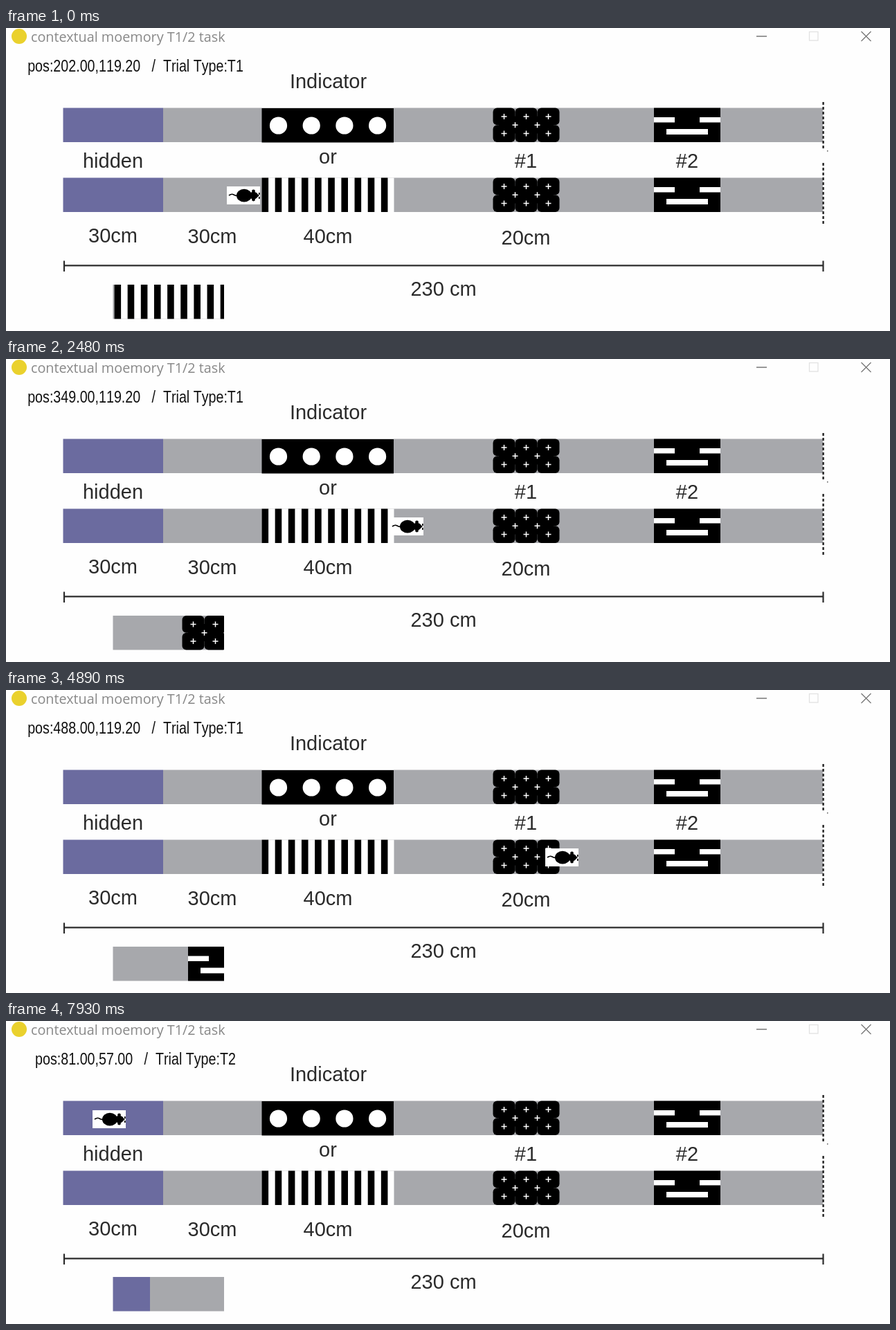
An HTML page that plays this animation: 1277 px wide and 438 px high, repeating every 8000 ms.

```html
<!DOCTYPE html>
<html lang="en">
<head>
<meta charset="utf-8">
<title>Context memory task</title>
<style>
  html, body { margin: 0; width: 100%; height: 100%; overflow: hidden; background: #fefefe; }
  svg { display: block; }
  text { font-family: "Liberation Sans", Arial, sans-serif; font-size: 29px; fill: #2b2b2b; text-anchor: middle; }
  #title { font-family: "Open Sans", "Noto Sans", sans-serif; font-size: 19.8px; fill: #888; text-anchor: start; }
  #status { font-size: 24px; fill: #111; font-kerning: none; }
</style>
</head>
<body>
<svg width="1277" height="438" viewBox="0 0 1277 438">
  <defs>
    <clipPath id="window"><rect x="154.5" y="362" width="160.5" height="68"/></clipPath>
    <g id="lane">
      <rect x="82.5" width="144.5" height="49.5" fill="#6b6b9f"/>
      <rect x="227" width="953" height="49.5" fill="#a7a8ac"/>
      <g id="plusTile"></g>
      <rect x="936" width="96" height="49.5"/>
      <path d="M936 13.5h30v7.5h-30zM1002 13.5h30v7.5h-30zM954 30.5h60v8h-60z" fill="#fff"/>
    </g>
    <g id="rat">
      <rect width="48" height="26" fill="#fff"/>
      <path d="M3 13q4-3 7-1t6 1" fill="none" stroke="#000" stroke-width="1.6"/>
      <ellipse cx="25" cy="13.2" rx="11" ry="9.4"/>
      <ellipse cx="38.5" cy="13" rx="6.5" ry="5.3"/>
      <circle cx="38.5" cy="7" r="2.4"/>
      <circle cx="38.5" cy="19" r="2.4"/>
      <path d="M41 9l6 4-6 5zM46 9h1.6v3h-1.6zM46 15h1.6v3h-1.6z"/>
    </g>
  </defs>

  <circle cx="19" cy="12" r="11" fill="#ead12d"/>
  <text id="title" x="36" y="19.5">contextual moemory T1/2 task</text>
  <g fill="none" stroke="#777" stroke-width="1.3">
    <path d="M1084 12h15M1235.5 5l14 14M1249.5 5l-14 14"/>
    <rect x="1160.5" y="5.5" width="12.5" height="12.5" stroke="#e2e2e2"/>
  </g>

  <text id="status" transform="translate(187 63) scale(.82 1)"></text>
  <g id="labels"></g>
  <g id="maze">
    <use href="#lane" y="115.5"/>
    <use href="#lane" y="216.5"/>
    <rect x="369.5" y="116" width="190.5" height="49.5"/>
    <g id="dots" fill="#fff"></g>
    <rect x="369.5" y="216.5" width="191" height="49.5" fill="#fff"/>
    <g id="stripes"></g>
    <path d="M1180.6 107v69M1180.6 195v88" stroke="#222" stroke-width="2.4" stroke-dasharray="4 3"/>
    <rect x="1186" y="177" width="1.5" height="1.5" fill="#555"/>
  </g>
  <path d="M84 343.4H1181M84 336.5v15.5M1180.5 336.5v15.5" fill="none" stroke="#2b2b2b" stroke-width="2.2"/>

  <g clip-path="url(#window)"><use id="view" href="#maze"/></g>
  <use id="runner" href="#rat"/>
</svg>
<script>
const el = id => document.getElementById(id);
const fill = (id, n, part) => {
  el(id).innerHTML = Array.from({ length: n }, (_, i) => part(i)).join('');
};

// Static parts built from repeats
const labels = [
  ['Indicator', 465.5, 87], ['hidden', 154.5, 202], ['or', 465, 196],
  ['#1', 751, 202], ['#2', 984, 202], ['30cm', 154.5, 310], ['30cm', 298, 310.5],
  ['40cm', 465, 311], ['20cm', 751, 313], ['230 cm', 632, 387]
];
fill('labels', labels.length, i => {
  const [word, x, y] = labels[i];
  return `<text x="${x}" y="${y}">${word}</text>`;
});
fill('dots', 4, i => `<circle cx="${393.5 + 47.7 * i}" cy="141" r="12.6"/>`);
fill('stripes', 10, i => `<rect x="${369.5 + 19.15 * i}" y="216.5" width="9.6" height="49.5"/>`);

const plus = (x, y) => `<path d="M${x - 4} ${y}h8M${x} ${y - 4}v8" stroke="#fff" stroke-width="1.5"/>`;
const cell = i => [703.5 + 32 * (i % 3), 24.75 * Math.floor(i / 3)];
fill('plusTile', 6, i => {
  const [x, y] = cell(i);
  return `<rect x="${x}" y="${y}" width="32" height="24.75" rx="6"/>`;
});
el('plusTile').innerHTML += '<rect x="712" y="12" width="79" height="25"/>' +
  [0, 1, 2, 3, 4, 5].map(i => plus(cell(i)[0] + 16, i < 3 ? 12.5 : 37)).join('') +
  plus(735.5, 24.75) + plus(767.5, 24.75);

// Tick bursts: first time, last time, number of position updates
const bursts = [
  [50, 840, 14], [910, 1690, 13], [1760, 2550, 13], [2620, 3380, 13], [3450, 4230, 13],
  [4300, 5080, 13], [5150, 5930, 13], [5980, 6840, 14], [6890, 7600, 11], [7670, 7930, 5]
];
const ticks = bursts.flatMap(([from, to, n]) =>
  Array.from({ length: n }, (_, i) => Math.round((from + (to - from) * i / (n - 1)) / 10) * 10));

const LOOP = 8000, SCALE = 1.607, RESET = 117;
const firstRun = [[0, 202], [20, 277], [39, 349], [63, 440], [88, 533], [107, 606], [116, 640]];
const secondRun = [[RESET, 60], [122, 81]];

function position(step) {
  const path = step < RESET ? firstRun : secondRun;
  const k = path.findIndex(([s], i) => i > 0 && step <= s);
  const [s0, p0] = path[k - 1], [s1, p1] = path[k];
  return Math.round(p0 + (p1 - p0) * (step - s0) / (s1 - s0));
}

let shown = -1;
function draw(time) {
  const step = ticks.filter(t => t <= time).length;
  if (step === shown) return;
  shown = step;
  const lower = step < RESET;
  const pos = position(step), y = lower ? 119.2 : 57;
  const left = Math.round(pos * SCALE - 5.6);
  const gap = '\u00a0';
  el('status').textContent = `pos:${pos.toFixed(2)},${y.toFixed(2)}${gap.repeat(3)}/${gap.repeat(2)}Trial Type:T${lower ? 1 : 2}`;
  el('runner').setAttribute('transform', `translate(${left} ${Math.round(y * SCALE + 37.4)})`);
  el('view').setAttribute('transform', `translate(${154 - left - 48} ${lower ? 154.5 : 254.5})`);
}

const start = performance.now();
function loop() {
  draw((performance.now() - start) % LOOP);
  requestAnimationFrame(loop);
}
loop();
</script>
</body>
</html>
```
